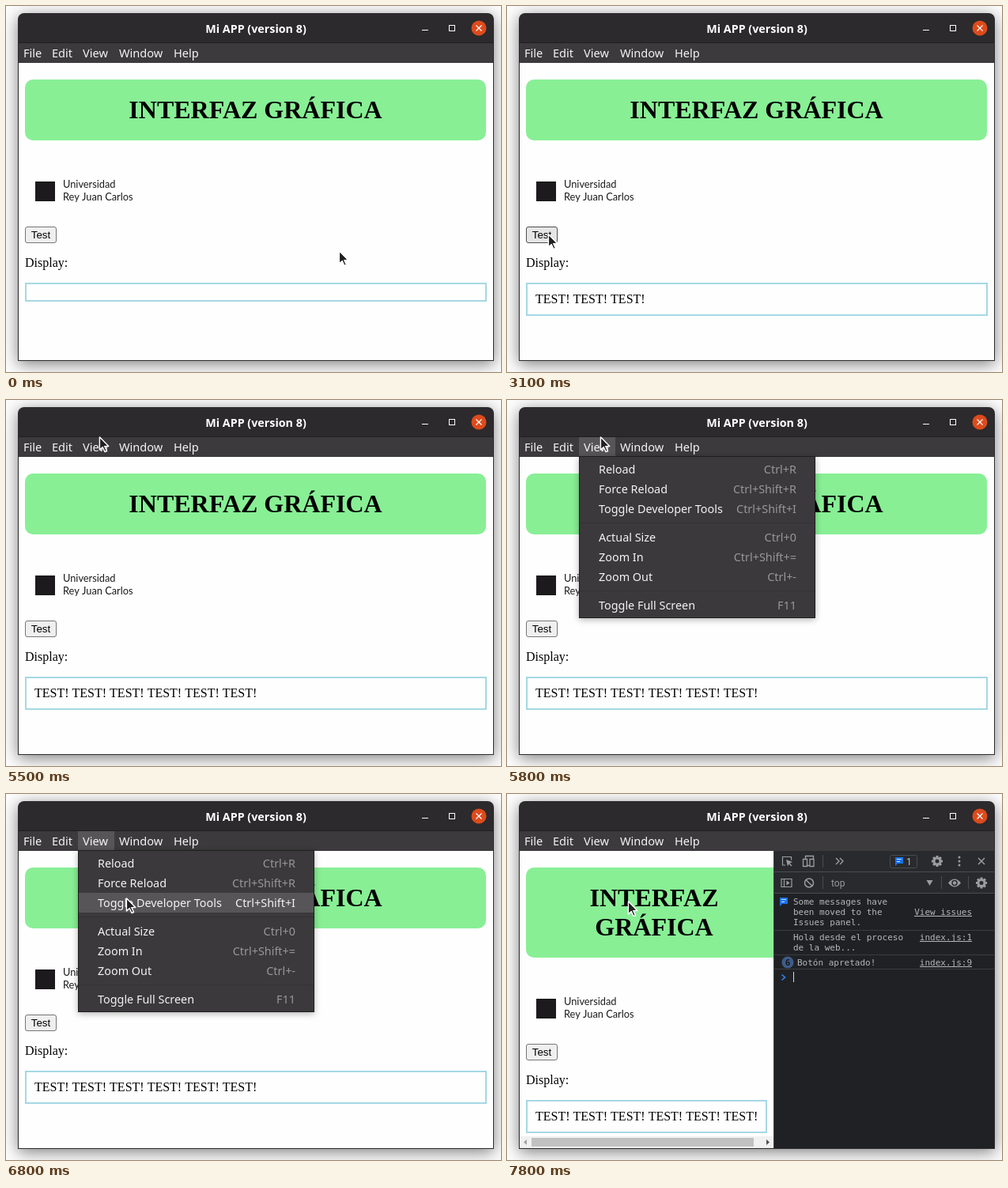
These frames come from a looping animation (626x463 px, 8000 ms). An HTML page with a canvas:

```html
<!DOCTYPE html>
<html lang="es">
<head>
<meta charset="utf-8">
<title>Mi APP</title>
<style>
  html, body { margin: 0; width: 100%; height: 100%; overflow: hidden; background: #fdfdfd; }
  canvas { display: block; }
</style>
</head>
<body>
<canvas id="stage" width="626" height="463"></canvas>
<script>
const ctx = document.getElementById('stage').getContext('2d');
const LOOP = 8000, STEP = 100;
const UI = '"Noto Sans", sans-serif';
const SERIF = '"Liberation Serif", serif';
const MONO = '11px "DejaVu Sans Mono", monospace';

// Pointer path: time, x, y
const PATH = [
  [500, 421, 310], [600, 410, 328], [900, 300, 443], [1100, 175, 402],
  [1300, 83, 338], [1400, 70, 322], [1700, 52, 289], [4700, 52, 289],
  [4900, 62, 258], [5300, 112, 82], [5500, 118, 47], [6000, 118, 47],
  [6200, 130, 78], [6400, 147, 115], [6600, 150, 128], [6700, 150, 128], [6900, 153, 136]
];
const TEST_TIMES = [2200, 2700, 3100, 3600, 4100, 4400];
const PRESSES = [[2100, 2200], [2600, 2700], [3500, 3600], [3900, 4100]];
const MENU_OPEN = 5600, MENU_CLOSE = 7000, SPLIT = 7400;
const DARK_PANEL = 7500, TOOLBARS = 7700, MESSAGES = 7800;

const MENU_BAR = [['File', 22], ['Edit', 58], ['View', 97], ['Window', 143], ['Help', 212]];
const MENU = [
  ['Reload', 'Ctrl+R', 88], ['Force Reload', 'Ctrl+Shift+R', 113],
  ['Toggle Developer Tools', 'Ctrl+Shift+I', 138], ['Actual Size', 'Ctrl+0', 174],
  ['Zoom In', 'Ctrl+Shift+=', 199], ['Zoom Out', 'Ctrl+-', 224], ['Toggle Full Screen', 'F11', 260]
];

function rect(x, y, w, h, color) {
  ctx.fillStyle = color;
  ctx.fillRect(x, y, w, h);
}
function round(x, y, w, h, r, fill, stroke) {
  ctx.beginPath();
  ctx.roundRect(x, y, w, h, r);
  if (fill) { ctx.fillStyle = fill; ctx.fill(); }
  if (stroke) { ctx.strokeStyle = stroke; ctx.lineWidth = 1; ctx.stroke(); }
}
function text(str, x, y, font, color = '#000', align = 'left') {
  ctx.font = font;
  ctx.fillStyle = color;
  ctx.textAlign = align;
  ctx.fillText(str, x, y);
}
function path(d, stroke, width = 1, fill) {
  const shape = new Path2D(d);
  if (fill) { ctx.fillStyle = fill; ctx.fill(shape); }
  if (stroke) { ctx.strokeStyle = stroke; ctx.lineWidth = width; ctx.stroke(shape); }
}
function circle(x, y, r, fill, stroke, width = 1) {
  ctx.beginPath();
  ctx.arc(x, y, r, 0, 7);
  if (fill) { ctx.fillStyle = fill; ctx.fill(); }
  if (stroke) { ctx.strokeStyle = stroke; ctx.lineWidth = width; ctx.stroke(); }
}

function pointerAt(t) {
  const next = PATH.findIndex(p => p[0] > t);
  if (next === 0) return PATH[0].slice(1);
  if (next < 0) return PATH[PATH.length - 1].slice(1);
  const [t0, x0, y0] = PATH[next - 1], [t1, x1, y1] = PATH[next];
  const k = (t - t0) / (t1 - t0);
  return [x0 + (x1 - x0) * k, y0 + (y1 - y0) * k].map(Math.round);
}

function drawWindow(menuOpen) {
  rect(0, 0, 626, 463, '#fdfdfd');
  ctx.save();
  ctx.shadowColor = 'rgba(0,0,0,.5)';
  ctx.shadowBlur = 20;
  ctx.shadowOffsetY = 4;
  round(15, 9, 602, 440, [8, 8, 0, 0], '#2c2a2c');
  ctx.restore();
  rect(16, 46, 600, 1, '#201f20');
  rect(16, 47, 600, 25, '#3c3a3c');
  rect(16, 72, 600, 376, '#fefefe');
  text('Mi APP (version 8)', 316, 34, 'bold 14.3px ' + UI, '#fff', 'center');
  rect(526, 30, 8, 1, '#fff');
  ctx.strokeStyle = '#fff';
  ctx.lineWidth = 1;
  ctx.strokeRect(560.5, 24.5, 7, 7);
  circle(598, 28, 9.5, '#dd4b1c');
  path('M594.5 24.5l7 7m0-7l-7 7', '#fff', 1.2);
  if (menuOpen) rect(91, 47, 46, 25, '#575557');
  for (const [label, x] of MENU_BAR) text(label, x, 65, '14.6px ' + UI, '#f4f4f4');
}

function drawButton(y, hover, pressed) {
  const fill = pressed ? '#f5f5f5' : hover ? '#e5e5e5' : '#efefef';
  const border = pressed ? '#8d8d8d' : hover ? '#4f4f4f' : '#767676';
  round(24.5, y + .5, 39, 20, 2.5, fill, border);
  text('Test', 44, y + 15, '13.33px "Liberation Sans", sans-serif', '#000', 'center');
}

function drawPage(t, split, hover) {
  const shift = split ? 37 : 0;
  const title = 'bold 32px ' + SERIF;
  ctx.save();
  ctx.beginPath();
  ctx.rect(16, 72, split ? 321 : 600, 376);
  ctx.clip();

  round(24, 93, split ? 330 : 583, 77 + shift, 10, '#88ef95');
  if (split) {
    text('INTERFAZ', 186, 142, title, '#000', 'center');
    text('GRÁFICA', 186, 179, title, '#000', 'center');
  } else {
    text('INTERFAZ GRÁFICA', 315.5, 142, title, '#000', 'center');
  }

  rect(37, 222 + shift, 25, 25, '#1c1a1c');
  const logoFont = '12.8px Lato, sans-serif';
  text('Universidad', 72, 230 + shift, logoFont, '#1c1a1c');
  text('Rey Juan Carlos', 72, 246 + shift, logoFont, '#1c1a1c');

  drawButton(279 + shift, hover, PRESSES.some(([a, b]) => t >= a && t < b));
  text('Display:', 24, 330 + shift, '16px ' + SERIF);

  const tests = TEST_TIMES.filter(time => t >= time).length;
  ctx.strokeStyle = '#a6d7e3';
  ctx.lineWidth = 2;
  ctx.strokeRect(25, 351 + shift, split ? 303 : 582, tests ? 40 : 22);
  text('TEST! '.repeat(tests), 36, 376 + shift, '16px ' + SERIF);

  if (split) {
    rect(16, 433, 321, 15, '#f1f1f1');
    rect(31, 435, 281, 11, '#c1c1c1');
    path('M25 437v7l-4-3.5z', null, 0, '#a3a3a3');
    path('M328 437v7l4-3.5z', null, 0, '#505050');
  }
  ctx.restore();
}

function drawMenu(pointerY) {
  ctx.save();
  ctx.shadowColor = 'rgba(0,0,0,.3)';
  ctx.shadowBlur = 8;
  ctx.shadowOffsetY = 2;
  rect(91, 71, 299, 205, '#1f1e1f');
  ctx.restore();
  rect(92, 72, 297, 203, '#3b393b');
  rect(92, 155, 297, 1, '#343234');
  rect(92, 241, 297, 1, '#343234');
  const font = '14.4px ' + UI;
  for (const [label, keys, y] of MENU) {
    const active = pointerY >= y - 13 && pointerY < y + 12;
    if (active) rect(92, y - 13, 297, 25, '#575557');
    text(label, 116, y + 5, font, '#f4f4f4');
    text(keys, 366, y + 5, font, active ? '#f4f4f4' : '#999799', 'right');
  }
}

function drawGear(x, y) {
  const color = '#999da1';
  for (let i = 0; i < 4; i++) {
    const a = i * Math.PI / 4, dx = 7 * Math.cos(a), dy = 7 * Math.sin(a);
    path(`M${x - dx} ${y - dy}L${x + dx} ${y + dy}`, color, 3);
  }
  circle(x, y, 4, '#292a2d', color, 3);
}

function drawBubble(x, y) {
  path(`M${x} ${y}h10v8h-7l-3 3z`, null, 0, '#1a73e8');
  path(`M${x + 2} ${y + 2.5}h6m-6 3h4`, '#c8ddfb', 1);
}

function drawToolbars() {
  const gray = '#999da1', line = '#494c50';
  rect(338, 72, 278, 53, '#292a2d');
  rect(338, 98, 278, 1, line);
  rect(338, 125, 278, 1, line);
  for (const [x, y] of [[399, 77], [399, 104], [549, 104], [583, 104]]) rect(x, y, 1, 16, line);

  path('M352 90h-3.5v-10.5h11v4', gray, 1.2);
  path('M353 83l8 3-3.5 1.5 3 3-1 1-3-3-1.5 3z', null, 0, gray);
  path('M377.5 82v-3.500h10v4m-5 8h-3', gray, 1.3);
  path('M374.5 82.500h5v9h-5zM383 82.500h5v9h-5z', gray, 1.3);
  path('M416 81l4 4-4 4m5-8l4 4-4 4', gray, 1.4);
  round(484.5, 77.5, 34, 16, 2, '#292a2d', line);
  drawBubble(491, 80);
  text('1', 505, 90, '12px Roboto, sans-serif', '#c2c5c9');
  drawGear(544, 85);
  for (const y of [80, 85, 90]) circle(572, y, 1.5, gray);
  path('M596 81l8 8m0-8l-8 8', gray, 1.5);

  path('M347 107.500h13v10h-13zM350.500 107v11', gray, 1.2);
  path('M353.500 109.500v6l4-3z', null, 0, gray);
  circle(382, 112.5, 5.5, null, gray, 1.5);
  path('M378 108.500l8 8', gray, 1.5);
  text('top', 410, 117, '12px Roboto, sans-serif', gray);
  path('M530.500 109h8l-4 7z', null, 0, gray);
  path('M558 112.500q8-10 16 0q-8 10-16 0z', null, 0, gray);
  circle(566, 112.500, 3, gray, '#292a2d', 1.5);
  drawGear(600, 112.5);
}

function drawMessages() {
  const color = '#b4b7ba';
  const say = (str, x, y) => text(str, x, y, MONO, color);
  const link = (str, y) => {
    text(str, 588, y, MONO, color, 'right');
    const w = Math.round(ctx.measureText(str).width);
    rect(588 - w, y + 1, w, 1, color);
  };
  drawBubble(345, 131);
  say('Some messages have', 362, 140);
  say('been moved to the', 362, 153);
  say('Issues panel.', 362, 166);
  link('View issues', 153);
  say('Hola desde el proceso', 362, 185);
  say('de la web...', 362, 198);
  link('index.js:1', 185);
  circle(355, 213, 7.5, '#3f5c88');
  text('6', 355, 217, 'bold ' + MONO, '#15171b', 'center');
  say('Botón apretado!', 367, 217);
  link('index.js:9', 217);
  for (const y of [172, 203, 221]) rect(338, y, 278, 1, '#3a3d41');
  path('M347.500 228.500l4 3.500-4 3.500', '#3484ee', 1.6);
  rect(362, 225, 1, 13, '#d5d7da');
}

function drawPointer(x, y) {
  ctx.save();
  ctx.translate(x + .5, y);
  ctx.lineJoin = 'round';
  path('M0 0V16L3.700 12.500L6.500 18.500L9 17.500L6.300 11.500H11.200Z', '#fff', 1.6, '#222022');
  path('M.8 2V14L4 11L7 17.200L7.700 17L4.800 10.700H9.300Z', null, 0, '#222022');
  ctx.restore();
}

function draw(now) {
  const t = Math.floor(now % LOOP / STEP) * STEP;
  const [x, y] = pointerAt(t);
  const menuOpen = t >= MENU_OPEN && t < MENU_CLOSE;
  const hover = x >= 24 && x < 64 && y >= 279 && y < 300;
  drawWindow(menuOpen);
  drawPage(t, t >= SPLIT, hover);
  if (menuOpen) drawMenu(y);
  if (t >= DARK_PANEL) {
    rect(337, 72, 279, 376, '#3a3d41');
    rect(338, 72, 278, 376, '#202124');
  }
  if (t >= TOOLBARS) drawToolbars();
  if (t >= MESSAGES) drawMessages();
  drawPointer(x, y);
}

const start = performance.now();
function tick() {
  draw(performance.now() - start);
  requestAnimationFrame(tick);
}
tick();
</script>
</body>
</html>
```
